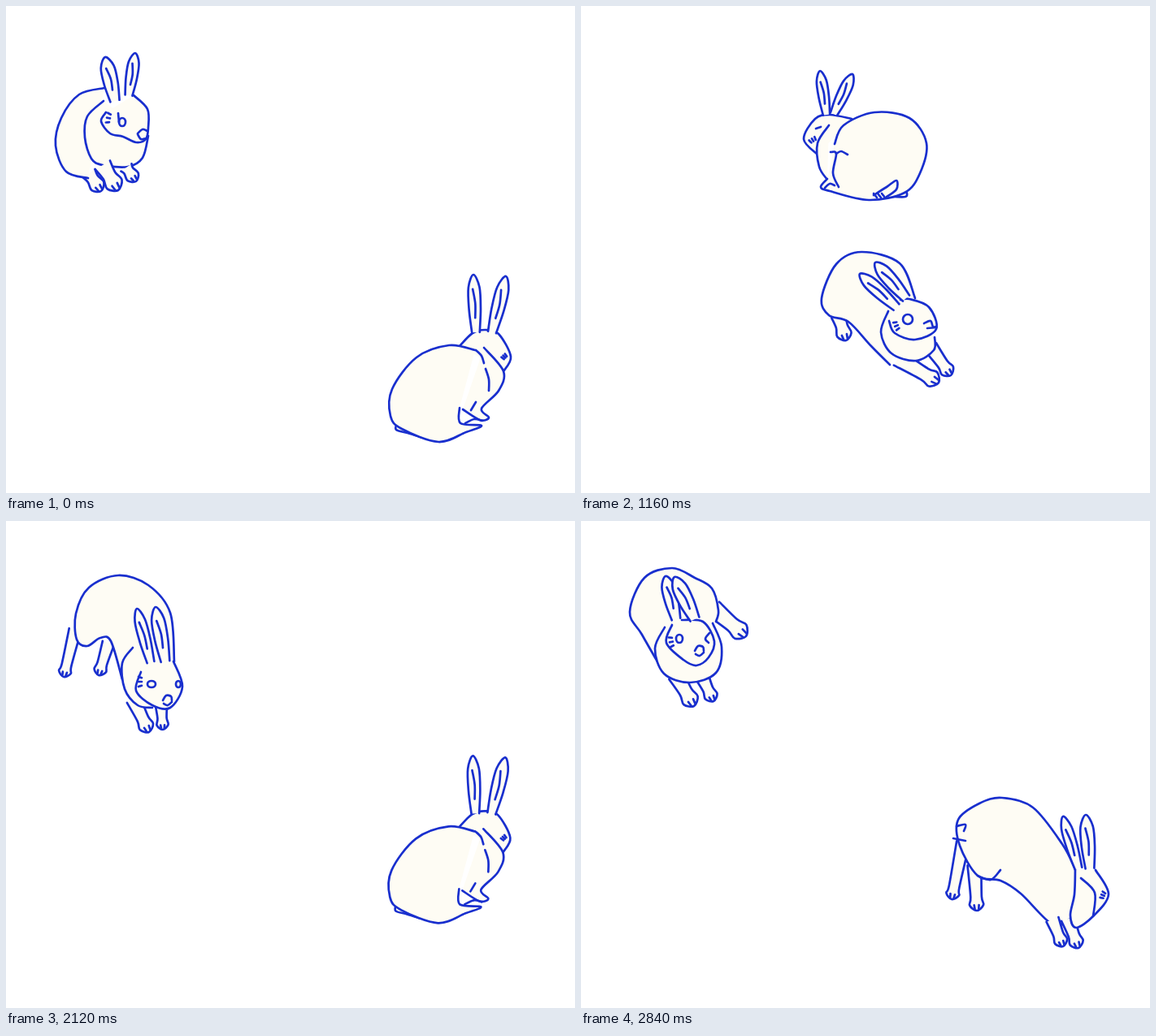
Write an HTML page with a canvas that moves like this. It is 700x600 px and loops after 2880 ms.

```html
<!DOCTYPE html>
<html lang="en">
<head>
<meta charset="utf-8">
<title>Two rabbits</title>
<style>
html, body { margin: 0; width: 100%; height: 100%; overflow: hidden; background: #fff; }
canvas { display: block; }
</style>
</head>
<body>
<canvas id="stage" width="700" height="600"></canvas>
<script>
const FRAME = 40, LOOP = 1440;
const ctx = document.getElementById('stage').getContext('2d');

// Smooth open curve through a few x, y key points.
function trace(coords) {
  const last = coords.length / 2 - 1;
  const at = i => {
    const k = 2 * Math.max(0, Math.min(last, i));
    return [coords[k], coords[k + 1]];
  };
  ctx.beginPath();
  ctx.moveTo(...at(0));
  for (let i = 0; i < last; i++) {
    const [[ax, ay], [bx, by], [cx, cy], [dx, dy]] = [at(i - 1), at(i), at(i + 1), at(i + 2)];
    ctx.bezierCurveTo(bx + (cx - ax) / 6, by + (cy - ay) / 6, cx - (dx - bx) / 6, cy - (dy - by) / 6, cx, cy);
  }
}

function line(...coords) {
  trace(coords);
  ctx.stroke();
}

function shape(...coords) {
  trace(coords);
  ctx.fill();
  ctx.stroke();
}

// Draws in a frame that runs from (0, 0) at the root to (length, 0) at the tip.
function along(x, y, tipX, tipY, draw) {
  ctx.save();
  ctx.translate(x, y);
  ctx.rotate(Math.atan2(tipY - y, tipX - x));
  draw(Math.hypot(tipX - x, tipY - y));
  ctx.restore();
}

function ear(x, y, tipX, tipY, width, tilt = 0) {
  along(x, y, tipX, tipY, length => {
    ctx.rotate(tilt);
    const h = width / 2;
    shape(0, -h * .6, length * .4, -h * .9, length * .78, -h * .85, length, 0,
      length * .78, h * .85, length * .4, h * .9, 0, h * .6);
    line(length * .75, -h * .2, length * .5, h * .1, length * .25, 0);
  });
}

function leg(x, y, tipX, tipY, width) {
  along(x, y, tipX, tipY, length => {
    const h = width / 2, ankle = length - width, toe = length - h * .8;
    shape(0, -h, ankle, -h * .8, toe, -h, length, 0, toe, h, ankle, h * .8, 0, h);
    for (const side of [-.35, .35]) line(toe, side * h, length - 2, side * width * .4);
  });
}

function eye(x, y, rx, ry = rx) {
  ctx.beginPath();
  ctx.ellipse(x, y, rx, ry, 0, 0, 2 * Math.PI);
  ctx.stroke();
}

// Three short dashes on the cheek, fanned around the given angle.
function whiskers(x, y, angle = 0, spread = 6) {
  ctx.save();
  ctx.translate(x, y);
  ctx.rotate(angle);
  for (let i = -1; i <= 1; i++) line(-2, i * spread, 2, i * spread * .8);
  ctx.restore();
}

function nose(x, y) {
  line(x - 5, y + 3, x - 1, y - 3, x + 5, y - 2, x + 6, y + 3);
  line(x - 4, y + 7, x + 1, y + 9, x + 6, y + 5);
}

const POSES = {
  frontSit(twitch) {
    leg(102, 206, 117, 228, 18);
    shape(121, 101, 90, 109, 68, 138, 61, 172, 74, 204, 101, 212);
    shape(120, 117, 100, 136, 97, 162, 105, 188, 119, 196, 150, 198, 168, 187, 175, 160);
    leg(148, 199, 160, 216, 16);
    leg(119, 196, 138, 227, 21);
    shape(157, 110, 174, 127, 175, 150, 172, 164, 160, 168, 144, 161, 128, 157, 117, 142, 123, 131);
    eye(143, 143, 4, 5);
    line(138, 132, 139, 143);
    line(162, 157, 168, 152, 174, 154);
    line(162, 158, 166, 164, 173, 163);
    whiskers(126, 138, .2);
    ear(134, 117, 122, 63, 19, twitch);
    ear(151, 110, 159, 58, 15, twitch);
  },

  backSit() {
    shape(481, 513, 480, 522, 494, 526, 510, 531);
    shape(558, 419, 574, 403, 590, 399, 606, 404, 621, 432, 612, 450);
    shape(588, 421, 612, 450, 606, 474, 585, 496, 594, 507, 583, 510, 562, 497);
    shape(577, 424, 545, 418, 505, 433, 475, 472, 473, 505, 487, 521, 532, 537, 566, 525, 585, 517, 559, 514, 558, 495);
    line(578, 424, 585, 431, 588, 440);
    line(590, 447, 594, 460, 594, 474);
    line(565, 514, 576, 509, 586, 511);
    line(572, 498, 578, 488);
    whiskers(613, 432, .8, 3);
    ear(578, 402, 575, 331, 16);
    ear(598, 402, 615, 333, 17);
  },

  dive() {
    leg(145, 124, 131, 182, 15);
    leg(186, 140, 174, 180, 15);
    shape(203, 185, 189, 138, 176, 134, 160, 144, 147, 136, 146, 104, 162, 72, 198, 57, 235, 69, 262, 103, 267, 163);
    leg(217, 210, 236, 250, 18);
    leg(251, 218, 253, 247, 14);
    shape(216, 146, 203, 165, 206, 197, 222, 217, 240, 220);
    shape(266, 163, 277, 194, 262, 220, 240, 217, 220, 199, 226, 176);
    eye(239, 191, 5, 4);
    eye(272, 191, 3, 4);
    nose(258, 208);
    whiskers(225, 188);
    ear(238, 164, 221, 98, 15);
    ear(256, 163, 244, 96, 18);
  },

  leftSit() {
    shape(614, 361, 613, 369, 589, 368);
    shape(547, 273, 520, 268, 502, 273, 488, 298, 505, 317);
    shape(519, 281, 505, 303, 507, 332, 517, 348);
    shape(526, 304, 537, 281, 575, 265, 618, 272, 639, 303, 631, 340, 612, 364, 568, 373, 520, 362, 509, 357, 517, 347);
    line(574, 367, 590, 357, 602, 349, 602, 360, 590, 369);
    line(531, 357, 524, 340, 528, 316, 521, 314);
    line(528, 316, 534, 313, 542, 317);
    line(514, 358, 520, 353, 526, 355);
    whiskers(499, 299, 1, 4);
    line(503, 285, 509, 283);
    for (let x = 574; x < 586; x += 5) line(x, 365, x + 4, 370);
    ear(516, 268, 508, 214, 14);
    ear(525, 267, 548, 218, 15);
  },

  frontLand() {
    leg(205, 153, 186, 214, 17);
    line(219, 140, 225, 135, 237, 138);
    shape(248, 295, 226, 262, 215, 222, 195, 206, 190, 175, 205, 148, 234, 138, 272, 154, 284, 190, 295, 246);
    leg(264, 302, 286, 328, 17);
    leg(291, 300, 305, 321, 15);
    shape(267, 252, 250, 270, 249, 292, 266, 305, 298, 300);
    shape(270, 262, 264, 275, 272, 291, 297, 296, 319, 280, 314, 258, 293, 247);
    eye(287, 272, 5);
    nose(309, 278);
    whiskers(276, 282, -.5);
    ear(263, 252, 242, 198, 17);
    ear(284, 250, 264, 190, 17);
  },

  leftLeap() {
    shape(516, 346, 532, 349, 556, 338);
    shape(507, 271, 484, 277, 475, 298, 494, 320);
    shape(512, 288, 499, 287, 492, 312, 504, 333, 514, 325);
    shape(513, 303, 520, 289, 553, 266, 595, 254, 630, 268, 646, 303, 636, 330, 597, 343, 572, 351, 556, 338, 555, 328);
    shape(534, 315, 522, 337, 500, 353, 490, 347, 507, 332, 518, 319);
    line(612, 322, 627, 320, 614, 338);
    line(615, 342, 624, 346, 632, 340);
    leg(606, 316, 607, 383, 18);
    leg(640, 318, 648, 380, 18);
    whiskers(486, 300, 1.5, 4);
    line(488, 284, 495, 288);
    ear(525, 279, 566, 243, 15);
    ear(507, 285, 549, 238, 17);
  },

  stretch() {
    leg(317, 382, 326, 412, 18);
    shape(411, 360, 392, 317, 345, 303, 314, 318, 296, 360, 305, 381, 329, 389, 357, 419, 380, 442);
    leg(430, 420, 455, 455, 17);
    leg(390, 434, 440, 464, 20);
    shape(378, 376, 369, 402, 382, 428, 412, 437, 434, 424, 435, 408);
    shape(393, 362, 404, 361, 428, 371, 437, 398, 411, 411, 386, 403, 379, 388);
    eye(402, 386, 6);
    line(422, 391, 430, 388, 433, 395, 437, 395);
    line(426, 397, 437, 396);
    whiskers(388, 394, -.4, 5);
    ear(400, 360, 362, 316, 18);
    ear(388, 371, 343, 330, 17);
  },

  frontKick() {
    leg(163, 108, 203, 142, 22);
    shape(99, 182, 75, 140, 60, 112, 78, 70, 112, 58, 140, 70, 161, 83, 169, 110, 166, 124);
    leg(117, 190, 139, 228, 20);
    leg(150, 194, 163, 222, 16);
    shape(103, 131, 91, 157, 102, 188, 134, 199, 166, 187, 173, 155, 162, 126);
    shape(112, 128, 105, 150, 126, 171, 142, 178, 157, 168, 164, 148, 150, 124, 124, 122);
    eye(121, 145, 4, 5);
    line(158, 138, 153, 145, 157, 150);
    nose(145, 157);
    whiskers(111, 149, -.2);
    ear(117, 121, 104, 68, 18);
    ear(140, 121, 115, 69, 20);
  },

  backKick() {
    leg(470, 396, 456, 466, 16);
    leg(484, 424, 487, 480, 17);
    shape(602, 490, 580, 497, 541, 459, 516, 443, 488, 437, 466, 400, 464, 368, 490, 348, 518, 341, 556, 353, 592, 398, 608, 429);
    line(488, 437, 504, 442, 516, 430);
    leg(580, 491, 593, 524, 16);
    leg(599, 490, 612, 526, 17);
    shape(633, 430, 649, 460, 630, 487, 609, 501, 602, 486, 607, 460, 608, 429);
    line(615, 440, 632, 458, 630, 487);
    line(462, 376, 473, 374, 471, 382);
    line(458, 391, 473, 394);
    whiskers(642, 461, .4, 4);
    ear(612, 428, 593, 364, 15);
    ear(626, 428, 621, 362, 18);
  }
};

// Each step glides evenly from one offset to another until the next step begins.
const HOME = [0, 0], LEAP = [-214, -134];
const step = (start, pose, from = HOME, to = from) => ({ start, pose, from, to });
const DOWN = [
  step(0, 'frontSit'),
  step(680, 'dive', [-60, 10], HOME),
  step(920, 'frontLand', HOME, [8, 6]),
  step(1000, 'frontSit', [165, 97], [172, 105]),
  step(1120, 'stretch', [-25, -16], [125, 80]),
  step(1400, 'backKick')
];
const UP = [
  step(0, 'backSit'),
  step(640, 'backSit', HOME, [-2, -125]),
  step(800, 'leftSit', [-17, 5], HOME),
  step(920, 'leftLeap', HOME, [-185, -135]),
  step(1120, 'leftSit', LEAP),
  step(1200, 'leftLeap', LEAP, [-318, -203]),
  step(1320, 'frontKick', [48, -23], HOME)
];

function drawRabbit(steps, phase) {
  const index = steps.findLastIndex(({ start }) => start <= phase);
  const { start, pose, from, to } = steps[index];
  const end = (steps[index + 1]?.start ?? LOOP) - FRAME;
  const mix = end > start ? (phase - start) / (end - start) : 0;
  const [x, y] = from.map((value, axis) => value + (to[axis] - value) * mix);

  const resting = phase < 640;
  const breath = resting && pose === 'backSit' ? .0075 * (1 - Math.cos(phase / 320 * Math.PI)) : 0;
  const twitch = resting && phase < 240 ? -.08 * Math.sin(phase / 240 * Math.PI) : 0;

  ctx.save();
  ctx.translate(x + 546, y + 528);
  ctx.scale(1 - breath, 1 + breath);
  ctx.translate(-546, -528);
  POSES[pose](twitch);
  ctx.restore();
}

ctx.fillStyle = '#fefcf4';
ctx.strokeStyle = '#192fce';
ctx.lineWidth = 2.7;
ctx.lineCap = ctx.lineJoin = 'round';
const startTime = performance.now();

function render() {
  const elapsed = performance.now() - startTime;
  const phase = Math.floor(elapsed / FRAME) * FRAME % LOOP;
  ctx.clearRect(0, 0, 700, 600);
  drawRabbit(DOWN, phase);
  drawRabbit(UP, phase);
  requestAnimationFrame(render);
}
render();
</script>
</body>
</html>
```
